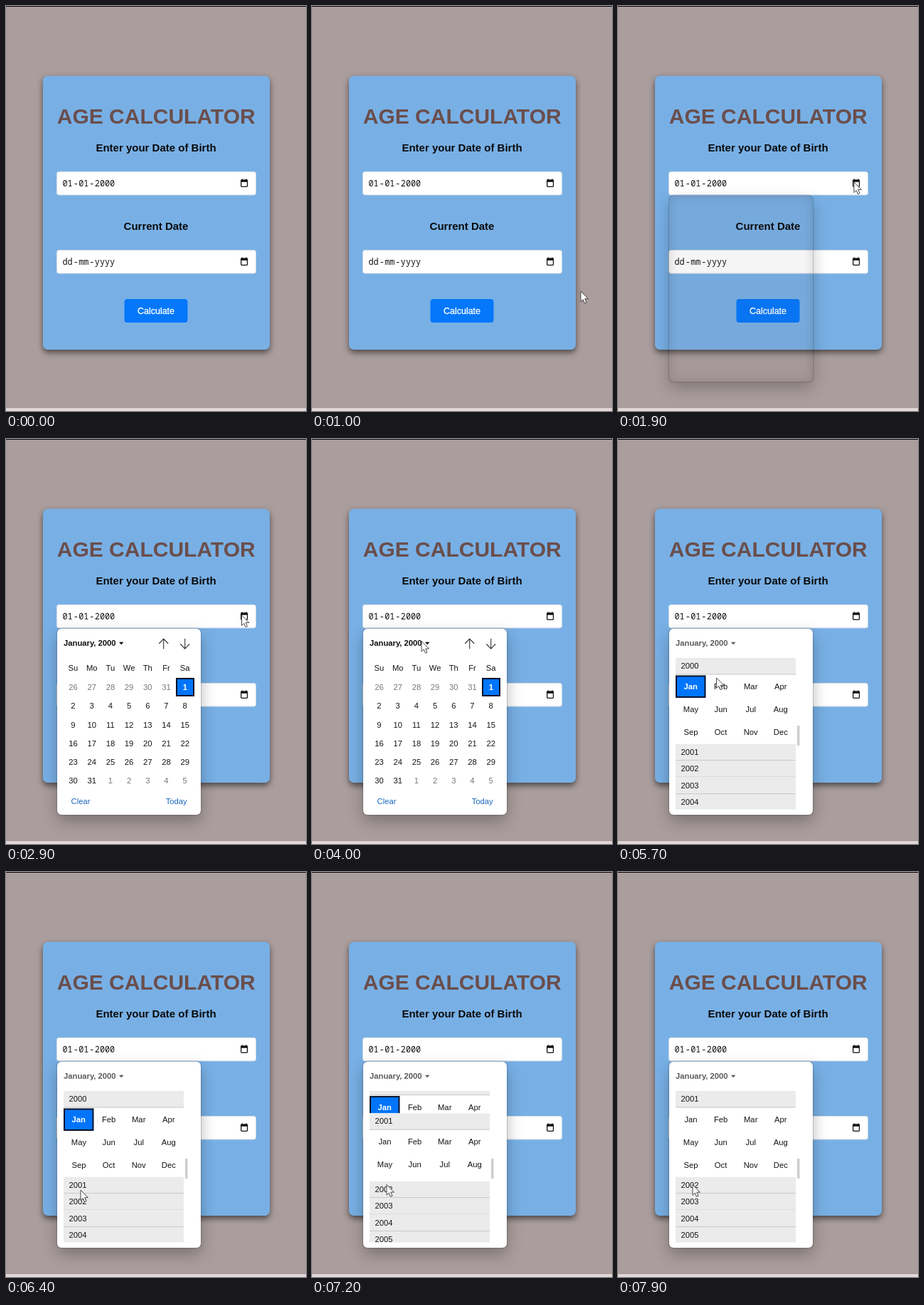
An HTML page for the animation above (8000 ms loop, 422x568 px).

```html
<!DOCTYPE html>
<html lang="en">
<head>
<meta charset="utf-8">
<title>Age calculator</title>
<style>
  html, body { margin: 0; width: 100%; height: 100%; overflow: hidden; background: #aa9d9d; }
  #stage { position: relative; width: 422px; height: 568px; overflow: hidden; background: #aa9d9d; }
  #stage > * { position: absolute; box-sizing: border-box; }
  .layer { left: 0; top: 0; width: 422px; height: 568px; }
  #top { left: 0; top: 0; width: 422px; height: 1px; background: #0c0a0a; }
  #bottom { left: 0; top: 564px; width: 422px; height: 4px; background: #e3d8d7; }
  #card { left: 52px; top: 98px; width: 319px; height: 384px; border-radius: 7px;
    background: #78b0e5; box-shadow: 0 4px 8px rgba(0, 0, 0, .55); }
  #popup { left: 72px; top: 266px; width: 202px; height: 261px; border-radius: 6px;
    background: #fff; box-shadow: 0 0 2px rgba(0, 0, 0, .5), 0 9px 22px rgba(0, 0, 0, .28); }
  #popup.ghost { background: rgba(90, 70, 70, .05);
    box-shadow: 0 0 2px rgba(0, 0, 0, .5), 0 9px 22px rgba(0, 0, 0, .24),
      inset 0 0 14px rgba(40, 30, 30, .18); }
  text { font-family: "Liberation Sans", Arial, sans-serif; }
  .mono { font-family: "Noto Sans Mono", "DejaVu Sans Mono", monospace; }
</style>
</head>
<body>
<div id="stage">
  <div id="top"></div>
  <div id="bottom"></div>
  <div id="card"></div>
  <svg class="layer" id="form"></svg>
  <div id="popup"></div>
  <svg class="layer" id="days"></svg>
  <svg class="layer" id="years"></svg>
  <svg class="layer" id="pointer"></svg>
</div>
<script>
const LOOP = 8000, STEP = 100;
const SHADOW_AT = 1900, POPUP_AT = 2000, YEARS_AT = 4400;
const SCROLL_FROM = 7000, SCROLL_TO = 7300;
const BLUE = '#0075fb', LINK = '#1766bd';
const ROW = 23.5, MONTHS_H = 97;

const byId = id => document.getElementById(id);
const form = byId('form'), popup = byId('popup'), days = byId('days'),
  years = byId('years'), pointer = byId('pointer');

function add(parent, tag, attrs, content = '') {
  const el = document.createElementNS('http://www.w3.org/2000/svg', tag);
  for (const key in attrs) el.setAttribute(key, attrs[key]);
  el.textContent = content;
  return parent.appendChild(el);
}

const rect = (parent, x, y, width, height, fill, more) =>
  add(parent, 'rect', { x, y, width, height, fill, ...more });

const line = (parent, d, stroke, width) =>
  add(parent, 'path', { d, stroke, 'stroke-width': width, fill: 'none' });

const label = (parent, content, x, y, size, fill, more) =>
  add(parent, 'text', { x, y, 'font-size': size, fill, ...more }, content);

const BOLD = { 'font-weight': 700 };
const MID = { 'text-anchor': 'middle' };
const small = (parent, content, x, y, fill = '#151515', more = MID) =>
  label(parent, content, x, y, 11.25, fill, more);

function selected(parent, content, x, y, w, h) {
  rect(parent, x + 1, y + 1, w - 2, h - 2, BLUE, { stroke: '#06122a', 'stroke-width': 2 });
  small(parent, content, x + w / 2, y + h / 2 + 4, '#fff', { ...MID, ...BOLD });
}

function dateField(y, parts) {
  rect(form, 71.5, y + .5, 280, 32.5, '#fff', { rx: 3, stroke: '#d3dce6' });
  const xs = [79.5, 94.8, 102.2, 117.3, 124.8];
  parts.forEach((part, i) => label(form, part, xs[i], y + 21, 11.8, '#111', { class: 'mono' }));
  rect(form, 330.7, y + 12.2, 8.8, 9.2, 'none', { rx: .8, stroke: '#111', 'stroke-width': 1.3 });
  rect(form, 330.2, y + 11.8, 9.8, 3, '#111');
  line(form, `M332.3 ${y + 10.6}v2M337.9 ${y + 10.6}v2`, '#111', 1.3);
}

function header(parent, fill) {
  small(parent, 'January, 2000', 81, 290, fill, BOLD);
  add(parent, 'path', { d: 'M159 284.8h6.4l-3.2 3.6z', fill });
}

function buildForm() {
  label(form, 'AGE CALCULATOR', 211.2, 164.5, 30, '#6b4e4c', { ...MID, ...BOLD });
  label(form, 'Enter your Date of Birth', 211, 204, 15, '#0a0a0c', { ...MID, ...BOLD });
  label(form, 'Current Date', 211, 313.5, 15, '#0a0a0c', { ...MID, ...BOLD });
  dateField(232, ['01', '-', '01', '-', '2000']);
  dateField(342, ['dd', '-', 'mm', '-', 'yyyy']);
  rect(form, 166.5, 411, 89, 33, '#0477fb', { rx: 4 });
  label(form, 'Calculate', 211, 432, 12.5, '#fff', { ...MID, stroke: '#fff', 'stroke-width': .3 });
}

function buildDays() {
  const colX = i => 94.5 + i * 26.2;
  header(days, '#111');
  line(days, 'M221.7 294.5v-14M215.2 287l6.5-6.7 6.5 6.7', '#333', 1.1);
  line(days, 'M251.7 280v14M245.2 287.5l6.5 6.7 6.5-6.7', '#333', 1.1);
  ['Su', 'Mo', 'Tu', 'We', 'Th', 'Fr', 'Sa'].forEach((d, i) => small(days, d, colX(i), 325));
  for (let i = 0; i < 42; i++) {
    const n = i - 5, x = colX(i % 7), y = 352 + Math.floor(i / 7) * 26.25;
    if (n === 1) selected(days, 1, 239, 335, 26, 26);
    else if (n < 1) small(days, n + 31, x, y, '#777');
    else if (n > 31) small(days, n - 31, x, y, '#777');
    else small(days, n, x, y);
  }
  small(days, 'Clear', 105, 512, LINK);
  small(days, 'Today', 239.7, 512, LINK);
}

// Each year is a band with a month grid below, cropped to the section's height.
function buildYears() {
  header(years, '#5c5c5c');
  rect(years, 252, 402, 3.5, 28, '#cfcfcf');
  const list = add(years, 'svg', { x: 81, y: 307, width: 169, height: 212.5, overflow: 'hidden' });
  const names = 'Jan Feb Mar Apr May Jun Jul Aug Sep Oct Nov Dec'.split(' ');
  return [2000, 2001, 2002, 2003, 2004, 2005].map(year => {
    const box = add(list, 'svg', { x: 0, width: 169, overflow: 'hidden' });
    rect(box, 0, 0, 169, ROW, '#ebebeb');
    line(box, `M0 ${ROW - .5}H169`, '#c9c9c9', 1);
    small(box, year, 7.5, 15, '#151515', {});
    if (year < 2002) names.forEach((name, i) => {
      const x = 21.5 + i % 4 * 42.1, y = 44 + Math.floor(i / 4) * 32;
      if (year === 2000 && i === 0) selected(box, name, 0, 24.5, 42.5, 31.5);
      else small(box, name, x, y);
    });
    return box;
  });
}

function layoutYears(p) {
  let y = -ROW * p;
  sections.forEach((box, i) => {
    const h = ROW + MONTHS_H * (i === 0 ? 1 - p : i === 1 ? p : 0);
    box.setAttribute('y', y);
    box.setAttribute('height', h);
    y += h;
  });
}

const clamp = v => Math.min(1, Math.max(0, v));
const ease = v => v * v * (3 - 2 * v);

// time, x, y of the pointer's tip
const path = [
  [800, 381, 440], [1000, 378, 400], [1600, 332, 247], [3100, 331.5, 247],
  [3800, 154, 283.5], [5400, 154, 283.5], [6200, 105, 446], [6600, 105, 446], [6800, 105, 438.5]
];

function pointerAt(t) {
  const i = path.findIndex(k => k[0] > t);
  if (i < 0) return path[path.length - 1].slice(1);
  const [t0, x0, y0] = path[i - 1], [t1, x1, y1] = path[i];
  const p = ease((t - t0) / (t1 - t0));
  return [x0 + (x1 - x0) * p, y0 + (y1 - y0) * p];
}

const show = (el, on) => { el.style.visibility = on ? 'visible' : 'hidden'; };

function draw(t) {
  show(popup, t >= SHADOW_AT);
  popup.className = t < POPUP_AT ? 'ghost' : '';
  show(days, t >= POPUP_AT && t < YEARS_AT);
  show(years, t >= YEARS_AT);
  layoutYears(ease(clamp((t - SCROLL_FROM) / (SCROLL_TO - SCROLL_FROM))));
  const visible = t >= path[0][0];
  show(pointer, visible);
  if (visible) arrow.setAttribute('transform', `translate(${pointerAt(t)})`);
}

buildForm();
buildDays();
const sections = buildYears();
const arrow = add(pointer, 'path', {
  d: 'M0 0V14.6L3.3 11.6L5.5 16.8L8 15.7L5.8 10.6H10.4Z',
  fill: '#fff', stroke: '#333', 'stroke-width': .9, 'stroke-linejoin': 'round'
});

const start = performance.now();
function tick() {
  const t = (performance.now() - start) % LOOP;
  draw(Math.floor(t / STEP) * STEP);
  requestAnimationFrame(tick);
}
tick();
</script>
</body>
</html>
```
